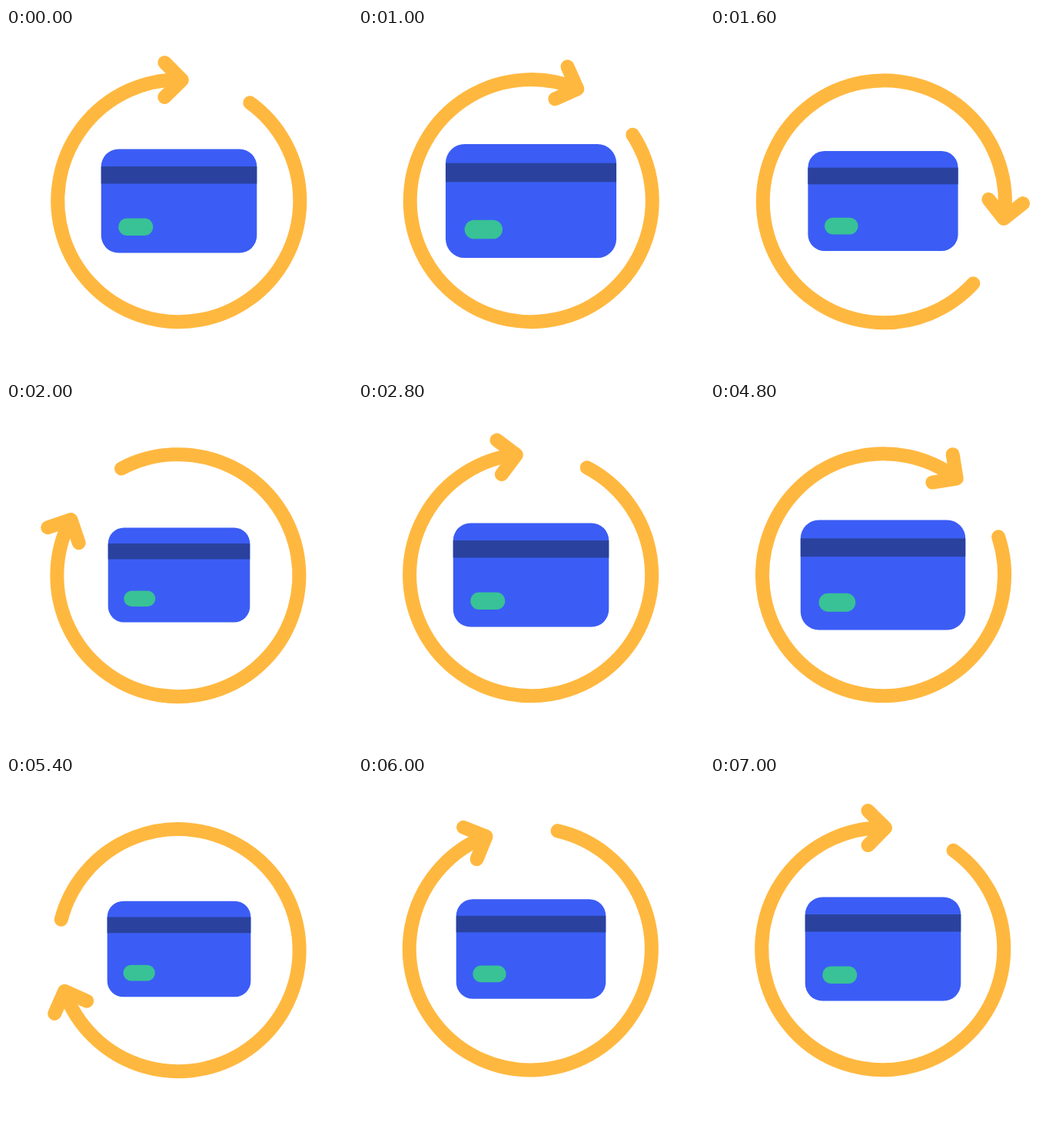
An HTML page for the animation above (7.2 s loop, 450 by 450 pixels).

```html
<!DOCTYPE html>
<html lang="en">
<head>
<meta charset="utf-8">
<title>Card refresh</title>
<style>
  html, body { margin: 0; width: 100%; height: 100%; overflow: hidden; background: #fff; }
  svg { display: block; width: 100vw; height: 100vh; }
</style>
</head>
<body>
<svg viewBox="0 0 450 450">
  <g id="arrow" fill="none" stroke="#ffb83f" stroke-width="18" stroke-linecap="round" stroke-linejoin="round">
    <path d="M317 97A157.5 157.5 0 1 1 228 67.2"/>
    <path d="M206 45L228.5 67.5L206 90"/>
  </g>
  <g id="card">
    <rect x="-101.25" y="-67.5" width="202.5" height="135" rx="22.5" fill="#3b5df5"/>
    <rect x="-101.25" y="-45" width="202.5" height="22.5" fill="#2a429e"/>
    <rect x="-78.75" y="22.5" width="45" height="22.5" rx="11.25" fill="#38c295"/>
  </g>
</svg>
<script>
const LOOP = 7200, CYCLE = 3578, STEP = 200;
const arrow = document.getElementById('arrow');
const card = document.getElementById('card');

const bezier = (a, b, c, d, s) => {
  const r = 1 - s;
  return a * r * r * r + 3 * b * r * r * s + 3 * c * r * s * s + d * s * s * s;
};

// One full turn: slow wind-up, fast sweep, long settle.
function turn(t) {
  let lo = 0, hi = 1;
  for (let i = 0; i < 30; i++) {
    const mid = (lo + hi) / 2;
    if (bezier(-100, 3230, 234, 3550, mid) < t) lo = mid; else hi = mid;
  }
  return bezier(0, 0, 360, 360, lo);
}

function ease(t, from, to) {
  const u = Math.min(1, Math.max(0, (t - from) / (to - from)));
  return u * u * (3 - 2 * u);
}

// The card swells, shrinks during the sweep, then returns to rest.
const size = t => 1 + 0.103 * ease(t, 0, 880)
  - 0.192 * ease(t, 880, 1980) + 0.089 * ease(t, 1980, 2800);

function draw(time) {
  const t = Math.floor(time % LOOP / STEP) * STEP % CYCLE;
  arrow.setAttribute('transform', `rotate(${turn(t)} 225.1 225.9)`);
  card.setAttribute('transform', `translate(225 225) scale(${size(t)})`);
}

const start = performance.now();
function tick() {
  draw(performance.now() - start);
  requestAnimationFrame(tick);
}
tick();
</script>
</body>
</html>
```
